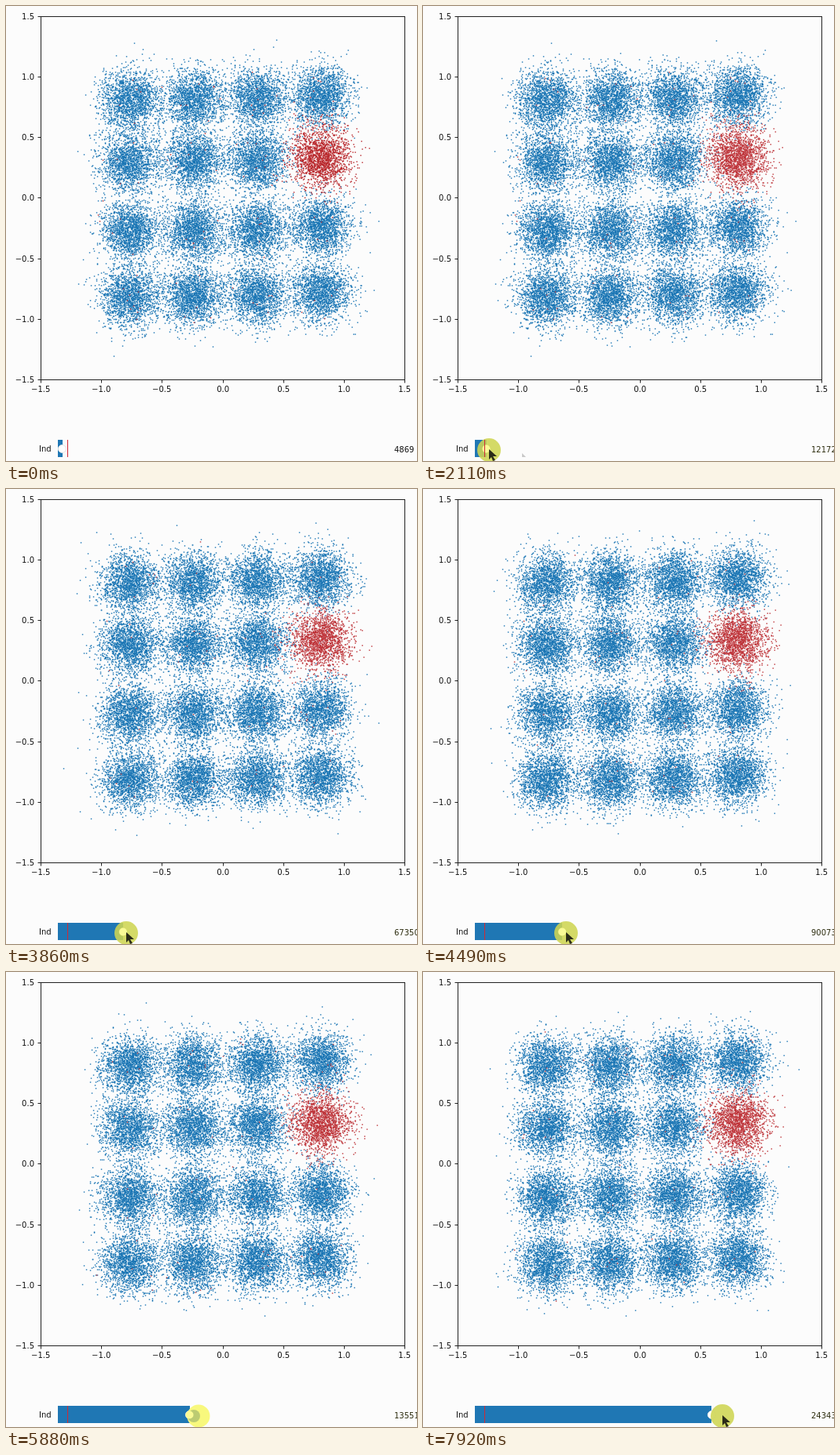
Write an HTML page with a canvas that moves like this. It is 523 px wide and 580 px high and loops after 8 s.

```html
<!DOCTYPE html>
<html>
<head>
<meta charset="utf-8">
<style>
  html, body { margin: 0; width: 100%; height: 100%; overflow: hidden; background: #fcfcfc; }
  canvas { display: block; }
</style>
</head>
<body>
<canvas id="stage" width="523" height="580"></canvas>
<script>
const ctx = document.getElementById('stage').getContext('2d');
const LOOP = 8000, STEP = 125, DRAG_START = 1610;
const SAMPLES = 28000, SIGMA = 18.7, RED_CLUSTER = 7;
const BLUE = '#1f77b4';
const ROWS = [119.5, 199, 287, 371];

// Drag path: step, slider value, pointer x
const drag = [
  [0, 11850, 84], [4, 12172, 84], [18, 67350, 153], [28, 112795, 211],
  [34, 135515, 245], [43, 189875, 304], [50, 243435, 381]
];

function dragAt(step) {
  if (step < 0) return [4869, 87];
  let i = drag.length - 2;
  while (step < drag[i][0]) i--;
  const [a, b] = [drag[i], drag[i + 1]];
  const k = Math.min(1, (step - a[0]) / (b[0] - a[0]));
  return [Math.round(a[1] + (b[1] - a[1]) * k), a[2] + (b[2] - a[2]) * k];
}

function random(seed) {
  let s = Math.imul(seed + 1, 0x9E3779B1);
  return () => {
    s = s + 0x6D2B79F5 | 0;
    let r = Math.imul(s ^ s >>> 15, 1 | s);
    r = r + Math.imul(r ^ r >>> 7, 61 | r) ^ r;
    return ((r ^ r >>> 14) >>> 0) / 4294967296;
  };
}

// Small marker centred on a whole pixel
function dot(x, y) {
  ctx.fillRect(Math.floor(x) - 0.22, Math.floor(y) - 0.22, 1.44, 1.44);
}

// Every sample has a fixed place; the slider moves a window over them
function scatter(start, redColor) {
  const reds = [];
  ctx.fillStyle = BLUE;
  for (let i = start; i < start + SAMPLES; i++) {
    const rnd = random(i);
    const cluster = Math.floor(rnd() * 16), col = cluster % 4;
    const r = SIGMA * Math.sqrt(-2 * Math.log(1 - rnd())), a = rnd() * 2 * Math.PI;
    const x = 158 + 81 * col + r * Math.cos(a);
    const y = ROWS[cluster >> 2] - 0.6 * col * col + r * Math.sin(a);
    const stray = rnd() < 0.003;
    if ((cluster === RED_CLUSTER) !== stray) reds.push([x, y]);
    else dot(x, y);
  }
  ctx.fillStyle = redColor;
  for (const [x, y] of reds) dot(x, y);
}

function axes() {
  ctx.strokeStyle = '#222';
  ctx.lineWidth = 1;
  ctx.strokeRect(44.5, 13.5, 463, 463);
  ctx.fillStyle = '#111';
  ctx.beginPath();
  for (let i = 0; i < 7; i++) {
    const label = (i / 2 - 1.5).toFixed(1).replace('-', '\u2212');
    const offset = Math.round(i * 463 / 6);
    const x = 44.5 + offset, y = 476.5 - offset;
    ctx.moveTo(x, 477);
    ctx.lineTo(x, 480.5);
    ctx.moveTo(44, y);
    ctx.lineTo(40.5, y);
    ctx.textAlign = 'center';
    ctx.fillText(label, x - 0.3, 492);
    ctx.textAlign = 'right';
    ctx.fillText(label, 36, y + 3.5);
  }
  ctx.stroke();
}

function disc(x, y, r, color) {
  ctx.fillStyle = color;
  ctx.beginPath();
  ctx.arc(x, y, r, 0, 2 * Math.PI);
  ctx.fill();
}

function polygon(x, y, points, color) {
  ctx.fillStyle = color;
  ctx.beginPath();
  for (const [dx, dy] of points) ctx.lineTo(x + dx, y + dy);
  ctx.closePath();
  ctx.fill();
}

const ARROW = [[0, 0], [0, 13], [3, 10], [5, 15], [8, 14], [5, 9], [10, 9]];
const pointer = (x, y) => polygon(x, y, ARROW, '#2b2b18');

function slider(t, value, px) {
  const x = 65.5 + value * 0.00124;
  const dragging = t >= DRAG_START;
  const released = t >= 5860 && t < 5985;

  if (t >= 735) polygon(126, 570, [[0, 0], [0, 5], [5, 5]], '#c9c9c9');
  ctx.fillStyle = BLUE;
  ctx.fillRect(66, 553, Math.round(x) - 66, 22);
  disc(x, 564.5, 5, '#fff');
  ctx.strokeStyle = '#e6e6e6';
  ctx.stroke();

  if (released) {
    disc(px, 566, 14.5, '#f8f87d');
    disc(px - 6, 566, 8, '#bccb72');
  } else if (dragging) {
    disc(px, 566, 15, 'rgba(206,213,82,.88)');
  }
  if (dragging && px - x < 13.5) disc(x, 564.5, 5, '#fafa96');

  ctx.fillStyle = '#d02a35';
  ctx.fillRect(78, 553, 1, 22);

  if (dragging && !released) pointer(px, 565);
  else if (t >= 860 && !dragging) pointer(px, 562);
  else if (t >= 610 && t < 735) pointer(126, 571);
}

function draw(step) {
  const t = DRAG_START + step * STEP;
  const [value, px] = dragAt(step);
  ctx.fillStyle = '#fcfcfc';
  ctx.fillRect(0, 0, 523, 580);
  ctx.font = '10px "DejaVu Sans", sans-serif';
  scatter(value, step < 0 ? '#b92b30' : '#bf393d');
  axes();
  ctx.textAlign = 'left';
  ctx.fillText('Ind', 42, 568);
  ctx.fillStyle = step < 0 ? '#111' : '#2e2e10';
  ctx.fillText(value, 494, 569);
  slider(t, value, px);
}

let shown;
const begin = performance.now();
function tick() {
  const t = (performance.now() - begin) % LOOP;
  const step = Math.floor((t - DRAG_START) / STEP);
  if (step !== shown) draw(shown = step);
  requestAnimationFrame(tick);
}
tick();
</script>
</body>
</html>
```
